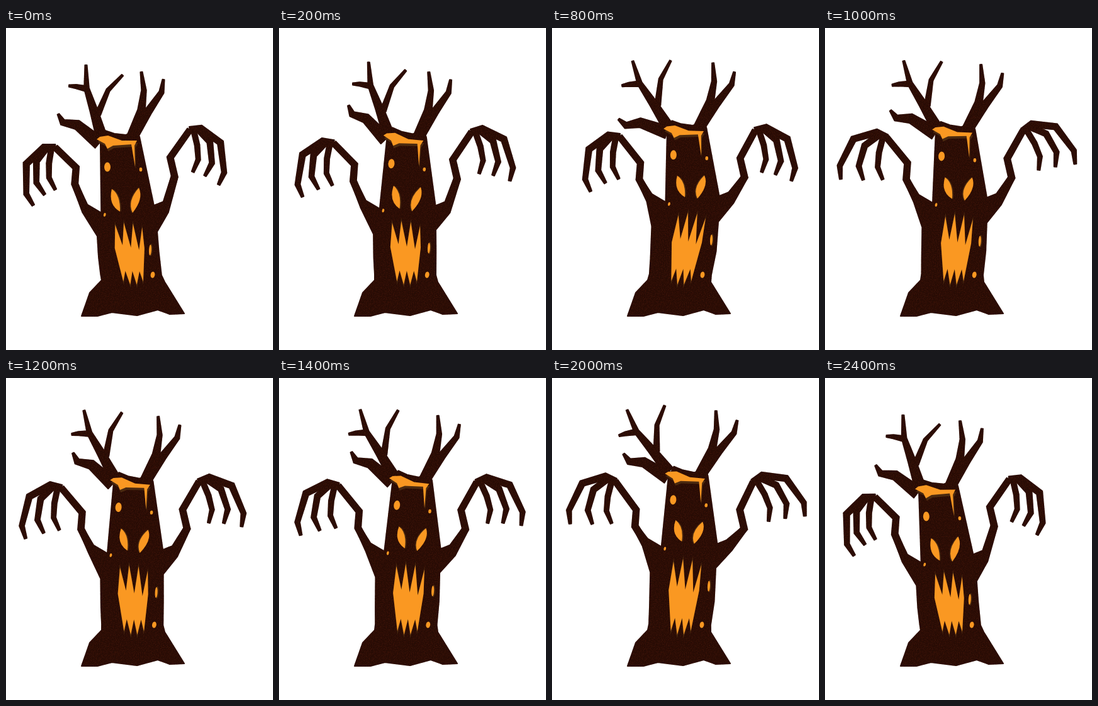
An HTML page for the animation above (2.5 s loop, 424 by 512 pixels).

```html
<!DOCTYPE html>
<html lang="en">
<head>
<meta charset="utf-8">
<title>Spooky tree</title>
<style>
html, body { margin: 0; width: 100%; height: 100%; overflow: hidden; background: #fff; }
svg { display: block; width: 100vw; height: 100vh; }
#wood { fill: #260b04; stroke: #260b04; stroke-width: 2; stroke-linejoin: round; }
#shade { fill: #4b2a10; }
#glow { fill: #fa9822; }
</style>
</head>
<body>
<svg viewBox="0 0 424 512">
  <filter id="grain" filterUnits="userSpaceOnUse" x="0" y="0" width="424" height="512" color-interpolation-filters="sRGB">
    <feTurbulence type="fractalNoise" baseFrequency=".6" numOctaves="2" seed="4"/>
    <feColorMatrix values="0 0 0 0 .28  0 0 0 0 .09  0 0 0 0 .04  1.6 0 0 0 -.6"/>
    <feComposite operator="in" in2="SourceGraphic" result="specks"/>
    <feMerge><feMergeNode in="SourceGraphic"/><feMergeNode in="specks"/></feMerge>
  </filter>
  <g id="wood" filter="url(#grain)"></g>
  <g id="shade"></g>
  <g id="glow"></g>
</svg>
<script>
const LOOP = 2500, STEP = 100;

// Key poses; the rest of the body follows from these.
const poses = [
  { at: 0, head: 176, chest: 193, height: 288, spread: 0, droop: 0 },
  { at: 400, head: 215, chest: 215, height: 281, spread: 18, droop: 10 },
  { at: 800, head: 209, chest: 223, height: 272, spread: 8, droop: -20 },
  { at: 1000, head: 202, chest: 214, height: 274, spread: 30, droop: -8 },
  { at: 1200, head: 197, chest: 205, height: 276, spread: 16, droop: 3 },
  { at: 1700, head: 221, chest: 224, height: 269, spread: 26, droop: -4 },
  { at: 2000, head: 211, chest: 218, height: 266, spread: 29, droop: -7 },
  { at: 2400, head: 175, chest: 194, height: 287, spread: -1, droop: -2 }
];

const shape = (text) => text.split(' ').map((p) => p.split(',').map(Number));

// Centre lines run from root to tip.
const tallBranch = ['152,173 140,132 128,95 127,58', '146,136 162,98 185,74', '129,96 111,92 100,91'].map(shape);
const lowBranch = shape('148,182 113,153 90,149 83,136');
const rightBranch = ['200,172 215,130 219,98 215,69', '201,172 225,133 247,101 250,81'].map(shape);
const fingers = ['0,0 -18,0 -46,26 -46,74 -35,92', '-14,1 -30,22 -30,56 -17,75', '-6,0 -10,25 -10,48 0,67'].map(shape);
const cavity = shape('144,176 149,172 162,170 184,178 208,178 204,186 205,220 199,184 170,186 161,191 157,183');
const leftEye = shape('168,255 162,280 181,291 182,264');
const rightEye = shape('211,253 192,274 201,293 219,270');
const foot = shape('152,401 133,421 120,458 145,458 168,452 208,457 241,448 260,455 283,454 252,404');

// Smooth periodic curve through one channel of the poses.
function sample(name, time) {
  const n = poses.length;
  const value = (k) => poses[(k + n) % n][name];
  const when = (k) => poses[(k + n) % n].at + LOOP * Math.floor(k / n);
  const i = poses.findLastIndex((pose) => pose.at <= time);
  const span = when(i + 1) - when(i), u = (time - when(i)) / span;
  const slope = (k) => (value(k + 1) - value(k - 1)) / (when(k + 1) - when(k - 1)) * span;
  return mix(value(i), value(i + 1), u * u * (3 - 2 * u))
    + u * (1 - u) * ((1 - u) * slope(i) - u * slope(i + 1));
}

const mix = (a, b, k) => a + (b - a) * k;
const blend = (p, q, k) => [mix(p[0], q[0], k), mix(p[1], q[1], k)];
const add = ([x, y], dx, dy) => [x + dx, y + dy];

function turn([x, y], degrees, [px, py] = [0, 0], [tx, ty] = [px, py]) {
  const a = degrees * Math.PI / 180, c = Math.cos(a), s = Math.sin(a);
  const dx = x - px, dy = y - py;
  return [tx + dx * c - dy * s, ty + dx * s + dy * c];
}

const text = (points) => points.map((p) => p.map((v) => v.toFixed(1)).join()).join(' ');
const poly = (points) => `<polygon points="${text(points)}"/>`;
const dot = ([x, y], rx, ry, angle = 0) =>
  `<ellipse rx="${rx}" ry="${ry}" transform="translate(${x} ${y}) rotate(${angle})"/>`;
const leaf = ([a, b, c, d]) => `<path d="M${text([a])}Q${text([b, c])}Q${text([d, a])}"/>`;

// Mitred outline around a bent line that narrows towards its tip.
function limb(points, wide, tip, curve = 1) {
  const left = [], right = [], last = points.length - 1;
  points.forEach(([x, y], i) => {
    const [ax, ay] = points[Math.max(i - 1, 0)], [bx, by] = points[Math.min(i + 1, last)];
    const before = Math.atan2(y - ay, x - ax), after = Math.atan2(by - y, bx - x);
    const start = i ? before : after, end = i < last ? after : before;
    const bend = Math.atan2(Math.sin(end - start), Math.cos(end - start)) / 2;
    const r = mix(wide, tip, (i / last) ** curve) / 2 / Math.max(Math.cos(bend), .7);
    const a = start + bend + Math.PI / 2;
    left.push([x + r * Math.cos(a), y + r * Math.sin(a)]);
    right.unshift([x - r * Math.cos(a), y - r * Math.sin(a)]);
  });
  return poly([...left, ...right]);
}

// side is 1 for the left hand and -1 for its mirror image.
function hand(wrist, side, spread, fold) {
  return fingers.map((points, k) => limb(points.map(([x, y]) =>
    turn([x * side, y], side * spread * (1 - k * fold), [0, 0], wrist)), 10 - k, 4, 3)).join('');
}

// A row of fangs above and below, stretched between the jaws.
function mouth(tl, tr, bottom, trim) {
  const bl = add(bottom, -22, -5), br = add(bottom, 9, -5);
  const at = (u, v, dx = 0) => add(blend(blend(tl, tr, u), blend(bl, br, u), v), dx, 0);
  const upper = [], lower = [];
  for (let k = 0; k < 4; k++) {
    const bump = k % 3 ? .05 : 0;
    upper.push(at(k / 3, trim - bump));
    lower.unshift(at(k / 3, 1 - trim + bump));
    if (k < 3) {
      upper.push(at((k + .55) / 3, .37 + k * .03));
      lower.unshift(at((k + .5) / 3, .78));
    }
  }
  return poly([...upper, at(1, .4, 3), ...lower, at(0, .42, -6)]);
}

const [wood, shade, glow] = ['wood', 'shade', 'glow'].map((id) => document.getElementById(id));

function draw(time) {
  const [headX, chestX, chestY, spread, droop] =
    ['head', 'chest', 'height', 'spread', 'droop'].map((name) => sample(name, time));
  const lean = chestX - headX, lift = 288 - chestY, sway = chestX - 193;
  const chest = [chestX, chestY], bottom = [209 + sway * .06, 413];
  const tilt = (17 - lean) * .55;
  const place = ([x, y]) => turn([x - 176, (y - 178) * (1 - lift * .004)], tilt, [0, 0], [headX, chestY - 109]);

  const leftPit = add(chest, -46 + lean * .25, lean * .35);
  const rightPit = add(chest, 46 - lean * .25, -lean * .35);
  const leftWaist = [145 + sway * .45, chestY + 43], rightWaist = [240 + sway * .8, chestY + 36];
  const leftCrook = add(leftPit, -22, -13), rightCrook = add(rightPit, 15, -6);

  const leftElbow = add(leftPit, -42, -46 + lift * .6), leftWrist = add(leftPit, -73, -104);
  const rightElbow = add(rightPit, 33 + lift * .45, -46 + lift), rightWrist = add(rightPit, 57, -120 + lift);

  const trunk = poly([
    place([150, 182]), leftPit, leftCrook, add(leftElbow, 4, -1), add(leftElbow, -4, 1),
    add(leftCrook, -8, 12), leftWaist, [mix(152, leftWaist[0], .7), 365], [mix(153, leftWaist[0], .35), 391],
    ...foot,
    [mix(249, rightWaist[0], .25), 393], [mix(250, rightWaist[0], .75), 355], rightWaist,
    add(rightCrook, 8, 17), add(rightElbow, 5, 1), add(rightElbow, -5, -1), rightCrook, rightPit,
    ...shape('212,172 207,163 190,169 172,167 157,162').map(place)
  ]);
  const branch = (points, degrees, root, wide) =>
    limb(points.map((p) => turn(p, degrees, root, place(root))), wide, 3);
  const leftRoot = [148, 177], rightRoot = [207, 178];

  wood.innerHTML = trunk
    + tallBranch.map((line, k) => branch(line, -lift, leftRoot, k ? 9 : 17)).join('')
    + branch(lowBranch, droop, leftRoot, 20)
    + rightBranch.map((line) => branch(line, lift * .25, rightRoot, 16)).join('')
    + limb([add(leftCrook, -4, 6), leftElbow, add(leftElbow, 2, -26), leftWrist], 10, 9)
    + limb([add(rightCrook, 4, 8), rightElbow, add(rightElbow, -7, -30), rightWrist], 10, 9)
    + hand(leftWrist, 1, spread * .9, .4)
    + hand(rightWrist, -1, spread + 7, .2);

  const eye = (points, shift) => leaf(points.map((p) => place(add(p, shift, 0))));
  const jaw = [add(chest, -28 + lean * .45, 20), add(chest, 18 + lean * .3, 26 - lean * .1), bottom];
  const slit = add(rightWaist, -11, 29);
  shade.innerHTML = poly(cavity.map((p) => place(add(p, 1.5, 4))))
    + eye(leftEye, 1.8) + eye(rightEye, -1.5)
    + mouth(...jaw, 0) + dot(add(slit, 1.3, 0), 2.4, 10, 3);
  glow.innerHTML = poly(cavity.map(place)) + eye(leftEye, 0) + eye(rightEye, 0)
    + dot(place([161, 220]), 5, 7.5, tilt) + dot(place([214, 224]), 2.3, 3.2, tilt)
    + dot(add(leftPit, 5.5, 3), 1.8, 3, 15) + dot(slit, 2, 8.5, 3)
    + dot([mix(233, rightWaist[0] - 7, .25), 392.5], 3.4, 5, 10)
    + mouth(...jaw, .05);
}

let shown = -1;
function tick() {
  const time = Math.floor(performance.now() % LOOP / STEP) * STEP;
  if (time !== shown) draw(shown = time);
  requestAnimationFrame(tick);
}
tick();
</script>
</body>
</html>
```
